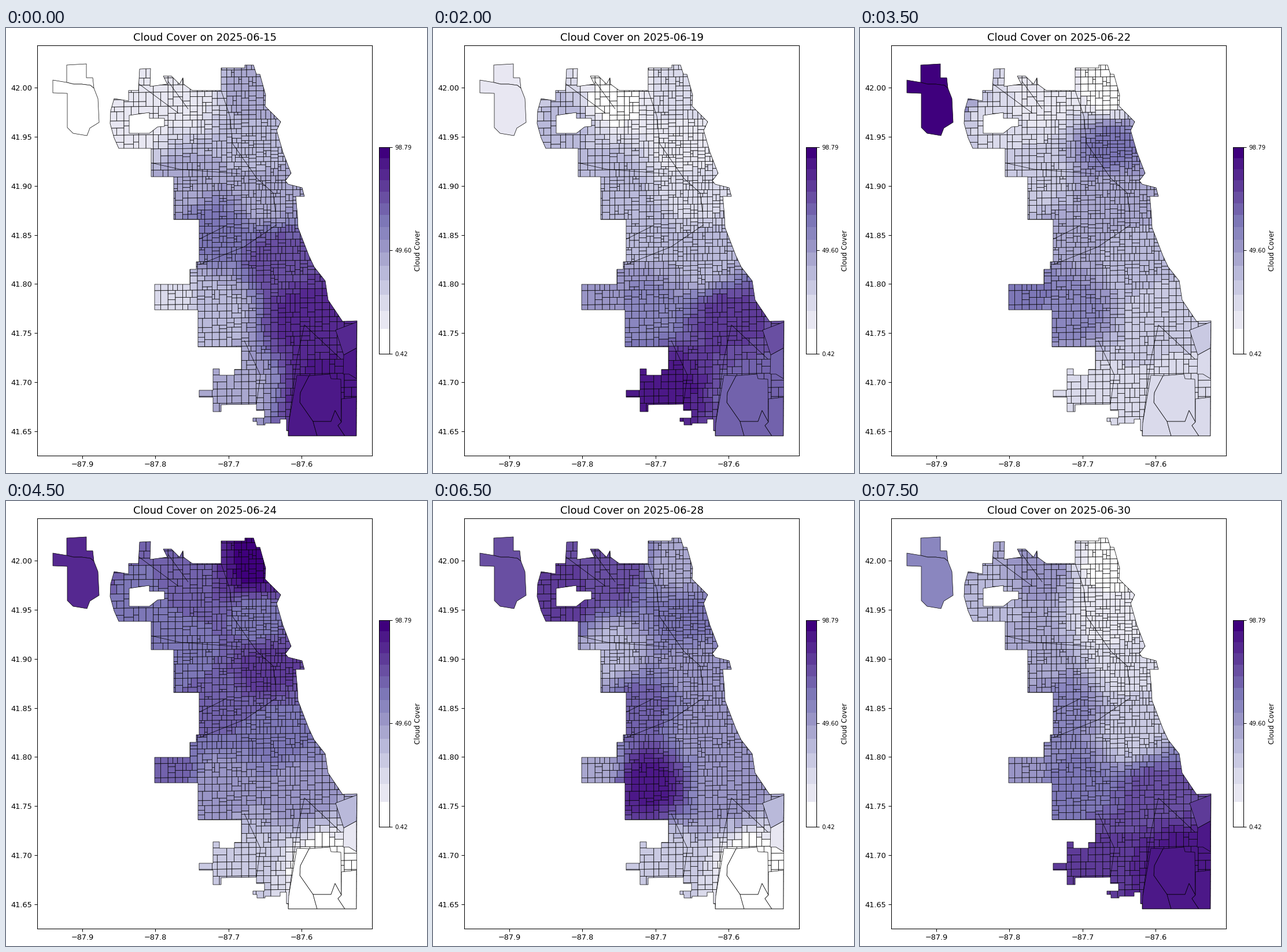
A matplotlib script that plays this animation: 728 by 769 pixels, repeating every 8000 ms.

```python
import numpy as np
import matplotlib as mpl
import matplotlib.pyplot as plt
from matplotlib.animation import FuncAnimation
from matplotlib.collections import LineCollection, PolyCollection
from matplotlib.path import Path

W, H = 728, 769
FIRST_DAY, DAYS = 15, 16
PT = 0.926  # scale from nominal to drawn point size
THIN = 0.5
MILE_X, MILE_Y = 25.4, 24.5
BANDS = 15

plt.rcParams["font.family"] = "DejaVu Sans"
rng = np.random.default_rng(7)


def stairs(x, y, *turns):
    """Walk in right angles: each turn is the next x, then the next y."""
    points = [(x, y)]
    for i, t in enumerate(turns):
        x, y = (x, t) if i % 2 else (t, y)
        points.append((x, y))
    return points


# Geometry is in stage pixels, y pointing down.
SHORE = [
    (372, 69), (413, 69), (413, 64), (428, 64), (433, 80), (439, 80), (449, 116),
    (448, 135), (475, 162), (468, 177), (479, 215), (493, 251), (483, 264),
    (488, 270), (512, 276), (516, 291), (501, 291), (504, 324), (505, 345),
    (524, 394), (533, 413), (552, 437), (557, 470), (582, 507), (607, 506),
]
SOUTH_EDGE = stairs(606, 705, 488, 696, 485, 676, 474, 683, 448, 686, 434, 680,
                    427, 674, 447, 661, 433, 650)
WEST_EDGE = stairs(372, 651, 372, 663, 358, 638, 334, 626, 358, 589, 369, 600,
                   395, 590, 407, 551, 332, 487, 257, 443, 318, 417, 329, 404,
                   334, 331, 290, 257, 251, 208)
NORTH_WEST = [
    (195, 208), (187, 190), (180, 165), (181, 143), (187, 122), (212, 126),
    (212, 108), (229, 108), (231, 71), (250, 70), (249, 101), (279, 97),
    (272, 83), (286, 83), (300, 97), (306, 86), (307, 97), (322, 108), (372, 108),
]
OUTLINE = SHORE + SOUTH_EDGE + WEST_EDGE + NORTH_WEST
ENCLAVE = [(213, 151), (248, 146), (248, 156), (274, 156), (274, 170), (262, 171),
           (248, 182), (213, 182)]

AIR_EDGE = [(105, 94), (117, 97), (131, 97), (146, 99), (152, 104)]
AIRPORT = [
    [(150, 86), (139, 86), (139, 62), (105, 64)] + AIR_EDGE,
    [(81, 90)] + AIR_EDGE + [(159, 122), (161, 163), (145, 173), (140, 186),
                             (116, 182), (106, 172), (106, 113), (81, 112)],
]

LAKE_WEST = [(524, 601), (509, 630), (508, 647), (531, 680)]
LAKE_SOUTH = [(531, 680), (562, 680), (569, 661), (580, 681)]
SOUTH_EAST = [
    LAKE_WEST + LAKE_SOUTH[1:] + [(579, 607), (562, 606), (560, 598)],
    [(503, 600), (489, 682), (488, 705), (538, 705)] + LAKE_WEST[::-1],
    LAKE_SOUTH + [(574, 687), (586, 705), (538, 705)],
    [(580, 641), (606, 638), (606, 705), (586, 705), (574, 687), (580, 681)],
    [(606, 553), (584, 565), (583, 598), (593, 598), (606, 606)],
    [(570, 522), (607, 508), (606, 553), (584, 565)],
]

STREETS = [
    [(372, 108), (387, 152), (392, 200), (434, 260), (462, 285), (466, 318)],
    [(334, 409), (412, 378), (468, 340)],
    [(334, 365), (380, 342)],
    [(516, 513), (579, 572)],
    [(516, 513), (503, 572), (489, 682)],
    [(412, 540), (440, 600), (433, 650)],
    [(229, 96), (298, 147)],
    [(280, 92), (315, 140)],
    [(251, 233), (300, 244), (405, 252)],
]


def skew(x, y):
    return x, y - 0.013 * (x - 331)


def split(x, y, w, h, area):
    """Cut a square mile into blocks of roughly the given area."""
    if w * h < area * rng.uniform(0.7, 1.5) and max(w / h, h / w) < 2.3:
        return [[skew(x, y), skew(x + w, y), skew(x + w, y + h), skew(x, y + h)]]
    t = rng.choice([0.5, 0.5, 0.5, 0.35, 0.65])
    if w > h * rng.uniform(0.7, 1.4):
        a, b = (x, y, w * t, h), (x + w * t, y, w * (1 - t), h)
    else:
        a, b = (x, y, w, h * t), (x, y + h * t, w, h * (1 - t))
    return split(*a, area) + split(*b, area)


def make_blocks(city):
    """Grid of square miles, cut finer towards the centre."""
    blocks = []
    for i in range(-6, 11):
        for j in range(-16, 11):
            x, y = 331 + MILE_X * i, 453 + MILE_Y * j
            area = 120 + 0.004 * (x - 430) ** 2 + 0.00125 * (y - 290) ** 2
            blocks += split(x, y, MILE_X, MILE_Y, area)
    return [b for b in blocks if city.intersects_path(Path(b + b[:1]), filled=True)]


PLACES = dict(
    airport=(130, 130), border=(225, 165), forest=(310, 120), beach=(430, 110),
    harbour=(435, 205), west=(310, 265), centre=(450, 285), canal=(360, 350),
    yards=(470, 400), stub=(280, 465), southwest=(370, 490), park=(510, 500),
    ridge=(400, 620), lake=(550, 630))
SITES = np.array(list(PLACES.values()), float)
sky = {}


def observe(day, **bands):
    sky[day] = [bands[place] for place in PLACES]


observe(15, airport=0, border=1, forest=1, beach=5, harbour=4, west=5, centre=5,
        canal=8, yards=10, stub=2, southwest=4, park=12, ridge=5, lake=13)
observe(19, airport=1, border=4, forest=0, beach=2, harbour=1, west=4, centre=2,
        canal=4, yards=4, stub=6, southwest=7, park=11, ridge=13, lake=9)
observe(22, airport=14, border=2, forest=1, beach=0, harbour=8, west=3, centre=5,
        canal=5, yards=4, stub=8, southwest=7, park=3, ridge=2, lake=2)
observe(24, airport=12, border=8, forest=9, beach=14, harbour=8, west=8, centre=11,
        canal=9, yards=8, stub=9, southwest=6, park=6, ridge=3, lake=0)
observe(26, airport=12, border=9, forest=7, beach=1, harbour=3, west=8, centre=1,
        canal=2, yards=0, stub=1, southwest=1, park=5, ridge=4, lake=5)
observe(28, airport=10, border=11, forest=10, beach=5, harbour=8, west=4, centre=6,
        canal=9, yards=6, stub=5, southwest=13, park=6, ridge=3, lake=0)
observe(30, airport=7, border=4, forest=6, beach=0, harbour=1, west=5, centre=2,
        canal=7, yards=3, stub=6, southwest=8, park=10, ridge=11, lake=13)


def place_levels(day):
    """Cloud band at each place, blended between the observed days."""
    days = sorted(sky)
    return np.array([np.interp(day, days, c) for c in zip(*(sky[d] for d in days))])


# Colour bands get narrower towards the top.
EDGES = np.linspace(0, 1, BANDS + 1) ** 0.78
SHADES = mpl.colormaps["Purples"]((EDGES[1:] + EDGES[:-1]) / 2)
SHADES[0] = 1
SHADES[-1] = mpl.colormaps["Purples"](1.0)


def stage_axes(fig, x0, y0, x1, y1):
    return fig.add_axes([x0 / W, 1 - y1 / H, (x1 - x0) / W, (y1 - y0) / H])


fig = plt.figure(figsize=(W / 100, H / 100), dpi=100, facecolor="white")
ax = stage_axes(fig, 54.1, 29.9, 633.1, 738.9)
ax.set(xlim=(54.1, 633.1), ylim=(738.9, 29.9))
lons = np.arange(-87.9, -87.55, 0.1)
lats = np.arange(41.65, 42.01, 0.05)
ax.set_xticks(132 + (lons + 87.9) * 1264, [f"\u2212{-v:.1f}" for v in lons])
ax.set_yticks(103 + (42 - lats) * 1697, [f"{v:.2f}" for v in lats])
tick_style = dict(length=3.5 * PT, pad=3.5 * PT, width=0.8 * PT)
ax.tick_params(labelsize=10 * PT, **tick_style)
title = ax.set_title("", fontsize=14 * PT, pad=6 * PT)

bar = stage_axes(fig, 645.1, 205.9, 663.1, 562.9)
bar.bar(0, np.diff(EDGES), bottom=EDGES[:-1], width=1, color=SHADES)
bar.set(xlim=(-0.5, 0.5), ylim=(0, 1), xticks=[])
bar.yaxis.tick_right()
bar.yaxis.set_label_position("right")
bar.set_yticks([0, 0.5, 1], ["0.42", "49.60", "98.79"])
bar.tick_params(labelsize=8 * PT, **tick_style)
bar.set_ylabel("Cloud Cover", fontsize=9 * PT, labelpad=4 * PT)
for side in [*ax.spines.values(), *bar.spines.values()]:
    side.set_linewidth(0.8 * PT)

city = Path(OUTLINE + OUTLINE[:1])
layers = []


def add_layer(polys, clip, z):
    coll = PolyCollection(polys, edgecolors="black", linewidths=THIN, zorder=z)
    ax.add_collection(coll, autolim=False)
    if clip:
        coll.set_clip_path(city, ax.transData)
    centres = np.array([np.mean(p, axis=0) for p in polys])
    dist2 = ((centres[:, None] - SITES[None]) ** 2).sum(axis=2)
    weight = (dist2 + 100) ** -2.0
    layers.append((coll, weight / weight.sum(axis=1, keepdims=True)))


add_layer(make_blocks(city), True, 1)
streets = LineCollection(STREETS, colors="black", linewidths=THIN, zorder=2)
ax.add_collection(streets, autolim=False)
streets.set_clip_path(city, ax.transData)
add_layer(SOUTH_EAST, True, 3)
add_layer(AIRPORT, False, 3)
ax.add_patch(plt.Polygon(ENCLAVE, fc="white", ec="black", lw=THIN, zorder=4))
ax.add_patch(plt.Polygon(OUTLINE, fill=False, ec="black", lw=THIN, zorder=5))


def update(frame):
    day = FIRST_DAY + frame
    levels = place_levels(day)
    for coll, weight in layers:
        coll.set_facecolor(SHADES[np.rint(weight @ levels).astype(int)])
    title.set_text(f"Cloud Cover on 2025-06-{day:02d}")
    return [title] + [coll for coll, _ in layers]


anim = FuncAnimation(fig, update, frames=DAYS, interval=500, repeat=True, repeat_delay=0)
plt.show()
```
